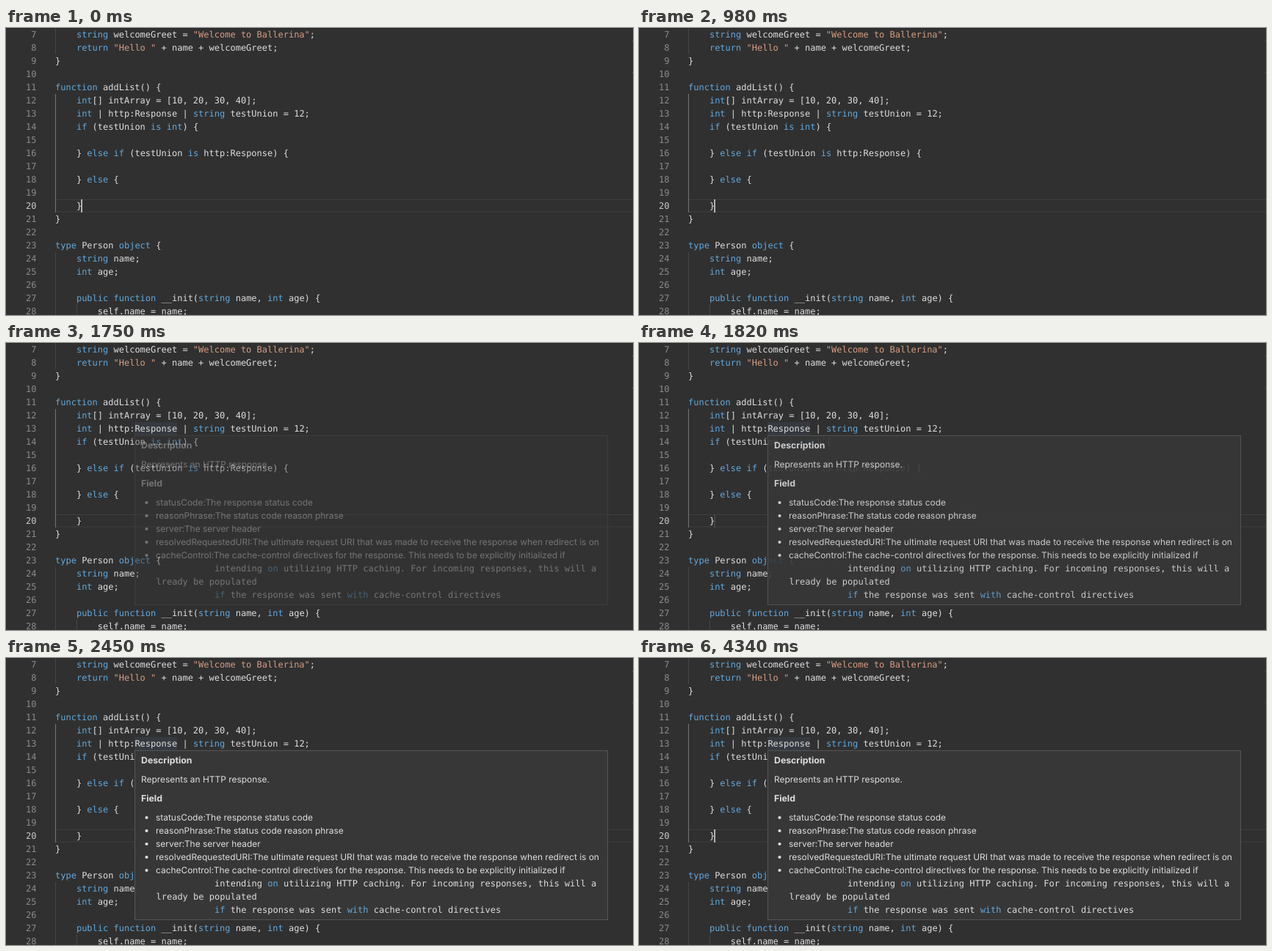
These frames come from a looping animation (854 px wide and 392 px high, 4.41 s). An HTML page:

```html
<!DOCTYPE html>
<html lang="en">
<head>
<meta charset="utf-8">
<title>Hover over a type</title>
<style>
  html, body { margin: 0; width: 100%; height: 100%; overflow: hidden; background: #303030; }
  svg { display: block; width: 100%; height: 100%; }
  text { fill: #dedede; white-space: pre; text-rendering: geometricPrecision; }
  .code { font: 12px "DejaVu Sans Mono", "Liberation Mono", monospace; }
  .prose { font: 11.95px Inter, "Open Sans", sans-serif; }
  .bold { font-weight: 700; font-size: 12.3px; }
  .key { fill: #62a8dc; }
  .str { fill: #d69c82; }
  .num { fill: #8b8b8b; text-anchor: end; }
  .active { fill: #cacaca; }
</style>
</head>
<body>
<svg id="stage" viewBox="0 0 854 392">
  <rect width="854" height="392" fill="#303030"/>
  <g id="editor"></g>
  <rect id="caret" x="102.3" y="234" width="1.6" height="18" fill="#d2d2d2"/>
  <g id="hover"></g>
</svg>
<script>
const LOOP = 4410, STEP = 70;
const LINE = 18, FIRST = 7, ACTIVE = 20, LEFT = 67;
// The caret starts to fade at these times, out and in by turns.
const BLINKS = [140, 630, 1190, 1820, 2240, 2730, 3220, 3780];
const BLINK_FADE = 280;
const HOVER_AT = 1695, HOVER_FADE = 140;

const SOURCE = `    string welcomeGreet = "Welcome to Ballerina";
    return "Hello " + name + welcomeGreet;
}

function addList() {
    int[] intArray = [10, 20, 30, 40];
    int | http:Response | string testUnion = 12;
    if (testUnion is int) {

    } else if (testUnion is http:Response) {

    } else {

    }
}

type Person object {
    string name;
    int age;

    public function __init(string name, int age) {
        self.name = name;`;

const FIELDS = [
  "statusCode:The response status code",
  "reasonPhrase:The status code reason phrase",
  "server:The server header",
  "resolvedRequestedURI:The ultimate request URI that was made to receive the response when redirect is on",
  "cacheControl:The cache-control directives for the response. This needs to be explicitly initialized if"
];

const TOKENS = /("[^"]*"|\b(?:string|return|function|int|if|is|else|type|object|public|on|with)\b)/;

const byId = id => document.getElementById(id);
const editor = byId("editor"), caret = byId("caret"), hover = byId("hover");

function add(parent, tag, attrs, content = "") {
  const el = document.createElementNS("http://www.w3.org/2000/svg", tag);
  for (const name in attrs) el.setAttribute(name, attrs[name]);
  el.textContent = content;
  return parent.appendChild(el);
}

function addText(parent, x, y, style, content) {
  return add(parent, "text", { x, y, class: style }, content);
}

function addCode(parent, x, y, content) {
  const row = addText(parent, x, y, "code", "");
  content.split(TOKENS).forEach((part, i) => {
    if (!part) return;
    const style = i % 2 ? (part[0] === '"' ? "str" : "key") : "";
    add(row, "tspan", { class: style }, part);
  });
}

function addRect(parent, x, y, width, height, fill) {
  return add(parent, "rect", { x, y, width, height, fill });
}

const lineTop = n => (n - FIRST) * LINE;

function addGuide(x, from, to, color) {
  addRect(editor, x, lineTop(from), 1, (to - from + 1) * LINE, color);
}

function buildEditor() {
  addRect(editor, 0, 0, 854, 1, "#292929");
  addRect(editor, LEFT, lineTop(ACTIVE), 787, 1, "#3e3e3e");
  addRect(editor, LEFT, lineTop(ACTIVE) + LINE - 1.5, 787, 1, "#3e3e3e");
  addGuide(LEFT, 7, 8, "#464646");
  addGuide(LEFT, 12, 20, "#747474");
  addGuide(LEFT, 24, 28, "#464646");
  addGuide(96, 28, 28, "#464646");
  for (const y of [17, 60]) addRect(editor, 853, y, 1, 2, "#4c4c4c");
  const mark = addRect(editor, 175, lineTop(13), 58, LINE, "#363a40");
  SOURCE.split("\n").forEach((row, i) => {
    const n = FIRST + i, y = lineTop(n) + 13;
    addText(editor, 41.5, y, "code num" + (n === ACTIVE ? " active" : ""), n);
    addCode(editor, LEFT, y, row);
  });
  return mark;
}

function buildHover() {
  add(hover, "rect", { x: 175.5, y: 126.5, width: 644, height: 231, fill: "#373737", stroke: "#555" });
  addText(hover, 184, 144, "prose bold", "Description");
  addText(hover, 184, 170, "prose", "Represents an HTTP response.");
  addText(hover, 184, 196, "prose bold", "Field");
  FIELDS.forEach((field, i) => {
    const y = 218 + i * LINE;
    add(hover, "circle", { cx: 191.5, cy: y, r: 2.1, fill: "#dedede" });
    addText(hover, 204, y + 4, "prose", field);
  });
  addCode(hover, 284, 312, "intending on utilizing HTTP caching. For incoming responses, this will a");
  addCode(hover, 204.5, 330, "lready be populated");
  addCode(hover, 284, 348, "if the response was sent with cache-control directives");
}

const clamp = v => Math.min(1, Math.max(0, v));
const ease = v => v * v * (3 - 2 * v);

function caretOpacity(t) {
  const past = BLINKS.filter(start => start <= t);
  if (!past.length) return 1;
  const p = ease(clamp((t - past[past.length - 1] + STEP) / BLINK_FADE));
  return past.length % 2 ? 1 - p : p;
}

const mark = buildEditor();
buildHover();

function render(time) {
  const t = Math.floor((time % LOOP) / STEP) * STEP;
  const shown = clamp((t - HOVER_AT) / HOVER_FADE);
  caret.setAttribute("opacity", caretOpacity(t));
  hover.setAttribute("opacity", shown);
  mark.setAttribute("opacity", t >= 1680 ? 1 : 0);
}

const begin = performance.now();
function tick() {
  render(performance.now() - begin);
  requestAnimationFrame(tick);
}
tick();
</script>
</body>
</html>
```
